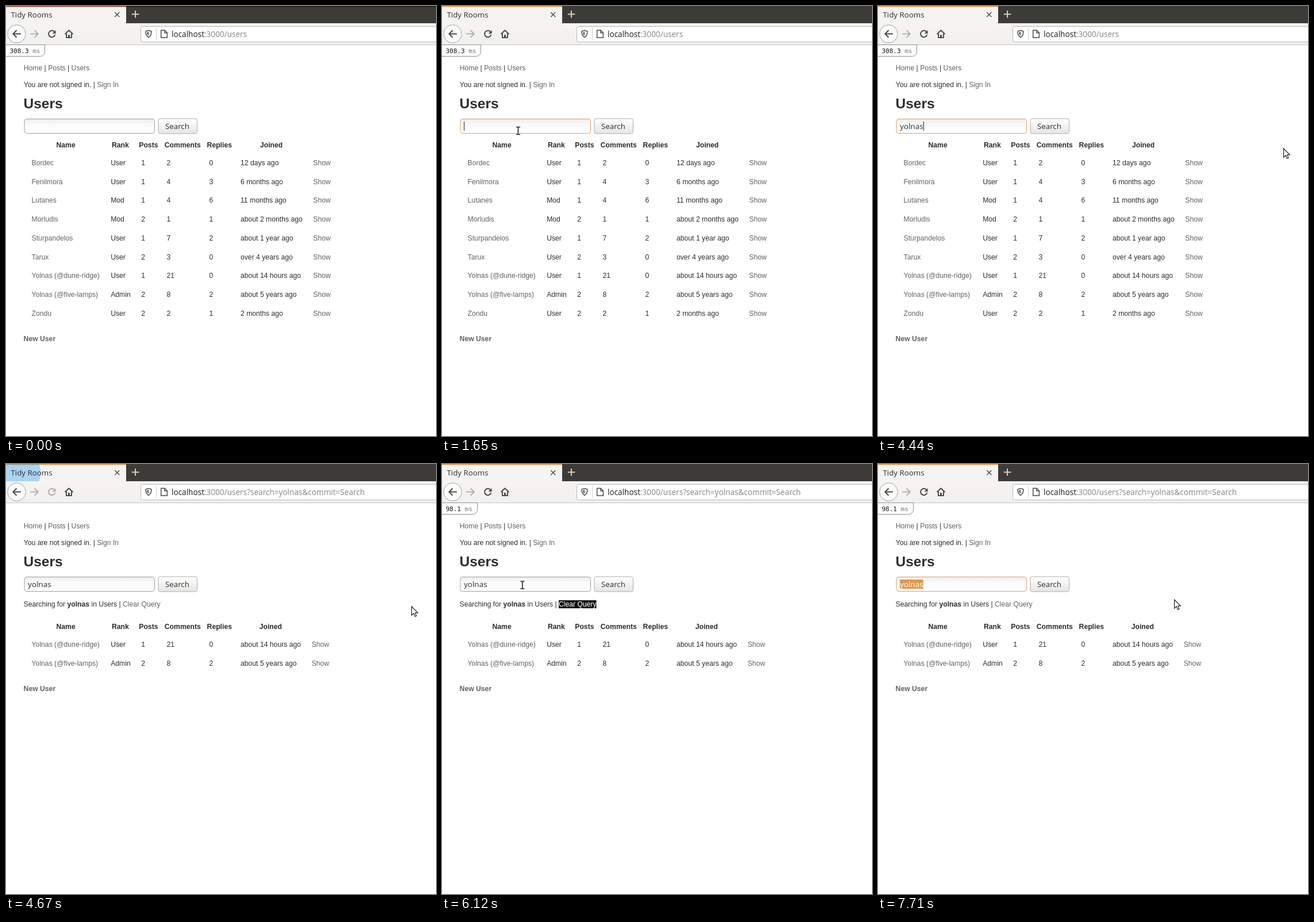
An HTML page that plays this animation: 748x748 px, repeating every 8000 ms.

```html
<!DOCTYPE html>
<html lang="en">
<head>
<meta charset="utf-8">
<title>User search</title>
<style>
  html, body { margin: 0; width: 100%; height: 100%; overflow: hidden; background: #fff; }
  svg { display: block; width: 100vw; height: 100vh; }
  text { font: 12.2px "Liberation Sans", Arial, sans-serif; fill: #2e2e2e; white-space: pre; }
  .bold { font-weight: bold; }
  .head { font-weight: bold; fill: #2b2b2b; }
  .link { fill: #626262; }
  .title { font-size: 24.5px; font-weight: bold; }
  .ui { font: 13.5px "Open Sans", "Noto Sans", sans-serif; fill: #2e2e2e; }
  .mono { font: 11px "DejaVu Sans Mono", monospace; fill: #111; }
  .icon { fill: none; stroke: #4c4c4c; stroke-width: 2; }
  .thin { stroke-width: 1.5; }
</style>
</head>
<body>
<svg id="stage" viewBox="0 0 748 748">
  <defs>
    <linearGradient id="field" x2="0" y2="1">
      <stop stop-color="#ececec"/><stop offset=".35" stop-color="#fafafa"/><stop offset="1" stop-color="#fff"/>
    </linearGradient>
    <linearGradient id="button" x2="0" y2="1">
      <stop stop-color="#fff"/><stop offset="1" stop-color="#e7e5e3"/>
    </linearGradient>
    <linearGradient id="bar" x2="0" y2="1">
      <stop stop-color="#f5f4f3"/><stop offset="1" stop-color="#f1f0ef"/>
    </linearGradient>
    <clipPath id="tab"><path d="M0 0H209V30H0z"/></clipPath>
    <path id="beamShape" d="M-3.5-6.5H-1L0-5.5 1-6.5H3.5M0-5.5V5.5M-3.5 6.5H-1L0 5.5 1 6.5H3.5"/>
  </defs>

  <rect width="748" height="748" fill="#fff"/>

  <!-- browser frame -->
  <rect width="748" height="30" fill="#3c3b37"/>
  <rect width="209" height="30" fill="#f5f4f3"/>
  <rect id="strip" width="209" height="1.6"/>
  <rect id="shade" x="209" width="539" height="1.6" fill="#2a1b17"/>
  <circle id="burst" cx="16" cy="15" fill="#1c96f0" clip-path="url(#tab)"/>
  <text class="ui" x="8.5" y="19.5" style="font-size:13.3px">Tidy Rooms</text>
  <path class="icon thin" d="M189.3 11l8 8m0-8l-8 8"/>
  <path class="icon" style="stroke:#d2cfc4" d="M225 8v12.5M218.8 14.2h12.5"/>
  <rect y="30" width="748" height="38" fill="url(#bar)"/>
  <path d="M0 67.5H748" stroke="#c4c2c0"/>
  <circle cx="18.5" cy="48.5" r="15.7" fill="#fbfbfa" stroke="#a3a19f"/>
  <path class="icon" d="M26 48.5H12.5M18.5 42.3l-6.2 6.2 6.2 6.2"/>
  <path class="icon" style="stroke:#b3b2b1" d="M42 48.5h13.5M49.7 42.3l6.2 6.2-6.2 6.2"/>
  <g id="reload">
    <path class="icon" d="M84.6 45.3a5.7 5.7 0 1 0 .8 4.5"/>
    <path d="M86.6 42v6h-6z" fill="#4c4c4c"/>
  </g>
  <path class="icon" d="M102.5 49l7-6.8 7 6.8M105 48v7h9v-7" stroke-linejoin="round"/>
  <rect x="108" y="50" width="3" height="5" fill="#4c4c4c"/>
  <rect x="234.5" y="35.5" width="530" height="27" rx="3" fill="#fff" stroke="#bab7b4"/>
  <path class="icon thin" d="M248 42.5l5 1.5c0 5-1 8-5 10.5-4-2.5-5-5.5-5-10.5z"/>
  <path d="M248 45v6.7c-2-1.5-2.5-3-2.6-6z" fill="#4c4c4c"/>
  <path d="M261.5 38V59" stroke="#cfcdcb"/>
  <path class="icon thin" d="M269.7 42.3h6.5l4.2 4.2v8.5h-10.7zM276 42.5v4.2h4.2"/>
  <text class="ui" x="288" y="53.8" style="font-size:13.6px;fill:#858585"><tspan fill="#1c1c1c">localhost</tspan>:3000/users<tspan id="query"></tspan></text>

  <!-- timing badge -->
  <g id="badge">
    <path id="badgeBox" fill="#fff" stroke="#8e8e8e"/>
    <text class="mono" x="6.5" y="81.5"><tspan id="badgeTime"></tspan><tspan fill="#777"> ms</tspan></text>
  </g>

  <!-- page -->
  <text x="30.7" y="112"><tspan class="link">Home</tspan> | <tspan class="link">Posts</tspan> | <tspan class="link">Users</tspan></text>
  <text x="30.8" y="141">You are not signed in. | <tspan class="link">Sign In</tspan></text>
  <text class="title" x="30.5" y="178">Users</text>
  <rect id="input" x="32" y="196.5" width="226.5" height="25" rx="4" fill="url(#field)"/>
  <rect id="selection" y="201" height="16" fill="#de994f"/>
  <text class="ui" id="value" x="38" y="213.5"><tspan id="plain"></tspan><tspan id="marked" fill="#fff"></tspan></text>
  <rect id="caret" y="201" width="1" height="16" fill="#222"/>
  <rect x="265" y="196" width="67.5" height="26" rx="3.5" fill="url(#button)" stroke="#b0aeac"/>
  <text class="ui" x="277" y="213.5" style="font-size:13.3px">Search</text>
  <g id="allUsers"></g>
  <g id="results">
    <text x="30.6" y="248">Searching for <tspan class="bold">yolnas</tspan> in Users |</text>
    <rect id="hover" x="203" y="237" width="65.5" height="14" fill="#111"/>
    <text id="clear" x="203" y="248">Clear Query</text>
  </g>

  <path id="arrow" d="M.6 1V16.2L4.2 12.8 6.5 18.2 9 17.1 6.7 11.9H11.3z" fill="#fff" stroke="#222" stroke-width="1.2"/>
  <g id="beam" fill="none">
    <use href="#beamShape" stroke="#fff" stroke-width="3"/>
    <use href="#beamShape" stroke="#222" stroke-width="1.6"/>
  </g>
</svg>
<script>
const $ = id => document.getElementById(id);
const set = (id, attrs) => { for (const k in attrs) $(id).setAttribute(k, attrs[k]); };
const show = (id, on) => { $(id).style.display = on ? '' : 'none'; };

const LOOP = 8000, WORD = 'yolnas';
const FOCUS = 1650, COMMIT = 4560, LOADED = 4640, BADGE = 4840, READY = 5240, REFOCUS = 6290, DRAGGED = 6700;
const keyTimes = [3370, 3580, 3720, 3880, 3990, 4100];

const users = `Bordec|User|1|2|0|12 days ago
Fenilmora|User|1|4|3|6 months ago
Lutanes|Mod|1|4|6|11 months ago
Morludis|Mod|2|1|1|about 2 months ago
Sturpandelos|User|1|7|2|about 1 year ago
Tarux|User|2|3|0|over 4 years ago
Yolnas (@dune-ridge)|User|1|21|0|about 14 hours ago
Yolnas (@five-lamps)|Admin|2|8|2|about 5 years ago
Zondu|User|2|2|1|2 months ago`.split('\n').map(row => row.split('|'));

const cell = (text, x, y, cls = '') => `<text class="${cls}" x="${x}" y="${y}">${text}</text>`;

function table(rows, top, joinedX, showX) {
  const heads = ['Name', 'Rank', 'Posts', 'Comments', 'Replies', 'Joined'];
  const headX = [87.5, 184, 231.3, 275.8, 349.6, joinedX];
  const cellX = [44.6, 182.2, 235.3, 279.6, 353.4, 408];
  let out = heads.map((h, i) => cell(h, headX[i], top, 'head')).join('');
  rows.forEach((row, r) => {
    const y = Math.round(top + 30.8 + r * 32.75);
    out += row.map((v, i) => cell(v, cellX[i], y, i ? '' : 'link')).join('') + cell('Show', showX, y, 'link');
  });
  return out + cell('New User', 30.6, Math.round(top + 42.2 + rows.length * 32.75), 'link bold');
}

$('allUsers').innerHTML = table(users, 246, 442, 534.3);
$('results').insertAdjacentHTML('beforeend', table(users.filter(u => u[0].startsWith('Yolnas')), 287, 440.7, 531.7));

const ctx = document.createElement('canvas').getContext('2d');
ctx.font = '13.5px "Open Sans", "Noto Sans", sans-serif';
const edge = n => 38 + ctx.measureText(WORD.slice(0, n)).width;

// pointer path: time, x, y
const path = [
  [650, 747, 380], [800, 742, 419], [960, 738, 412], [1110, 738, 412],
  [1300, 440, 300], [1430, 190, 232], [1510, 132.5, 217], [1750, 132.5, 217],
  [1900, 400, 240], [2050, 696, 257], [2170, 696, 257], [2330, 704, 247],
  [2490, 704, 247], [2530, 705, 247], [5420, 705, 247], [5540, 711, 250],
  [5760, 480, 252], [5960, 240, 246], [6120, 140, 210.5], [6240, 132.5, 208],
  [6300, 132.5, 208], [DRAGGED, 17.5, 208], [6800, 17.5, 206],
  [7060, 103.5, 196.5], [7090, 103.5, 196.5], [7380, 300, 212], [7710, 515, 235]
];

function pointer(t) {
  const i = path.findIndex(p => p[0] > t);
  if (i < 0) return path.at(-1).slice(1);
  if (i === 0) return path[0].slice(1);
  const a = path[i - 1], b = path[i], k = (t - a[0]) / (b[0] - a[0]);
  return [1, 2].map(j => a[j] + (b[j] - a[j]) * k);
}

function drawPointer(t) {
  const [x, y] = pointer(t);
  const inField = x > 32 && x < 259 && y > 195 && y < 222;
  const dragging = t > REFOCUS && t < 7090;
  const beam = inField || dragging;
  show('beam', t >= 650 && beam);
  show('arrow', t >= 650 && !beam);
  set(beam ? 'beam' : 'arrow', { transform: `translate(${x} ${y})` });
}

function drawField(t) {
  const focused = (t >= FOCUS && t < LOADED) || t >= REFOCUS;
  set('input', { stroke: focused ? '#dea067' : '#a19f9d' });
  const typed = keyTimes.filter(k => k <= t).length;
  let start = typed;
  if (t >= REFOCUS) {
    const x = pointer(Math.min(t, DRAGGED))[0];
    start = [...WORD].filter((c, i) => (edge(i) + edge(i + 1)) / 2 < x).length;
  }
  $('plain').textContent = WORD.slice(0, start);
  $('marked').textContent = WORD.slice(start, typed);
  set('selection', { x: edge(start), width: edge(typed) - edge(start) });
  set('caret', { x: Math.round(edge(typed)) });
  show('caret', focused && start === typed && !(t >= 2770 && t < 3370));
}

function drawFrame(t) {
  set('strip', { fill: t < 650 ? '#8f4f3b' : '#e19a52' });
  show('shade', t < 650);

  const p = (t - LOADED) / 375;
  show('burst', p > 0 && p < 1);
  if (p > 0 && p < 1) {
    const e = 1 - (1 - p) ** 1.7;
    set('burst', { r: 7 + 273 * e, opacity: 0.4 * (1 - e) });
  }

  $('query').textContent = t >= COMMIT ? `?search=${WORD}&commit=Search` : '';
  set('reload', { opacity: t >= LOADED && t < READY ? 0.4 : 1 });

  const right = t < LOADED ? 67.5 : 61.5;
  show('badge', t < LOADED || t >= BADGE);
  set('badgeBox', { d: `M-1 67.5H${right}V79.5a8 8 0 0 1-8 8H-1z` });
  $('badgeTime').textContent = t < LOADED ? '308.3' : '98.1';

  show('allUsers', t < LOADED);
  show('results', t >= LOADED);
  const hovered = t >= 5950 && t < 6160;
  show('hover', hovered);
  $('clear').style.fill = hovered ? '#fff' : '#626262';

  drawField(t);
  drawPointer(t);
}

const begin = performance.now();
function tick() {
  drawFrame((performance.now() - begin) % LOOP);
  requestAnimationFrame(tick);
}
tick();
</script>
</body>
</html>
```
